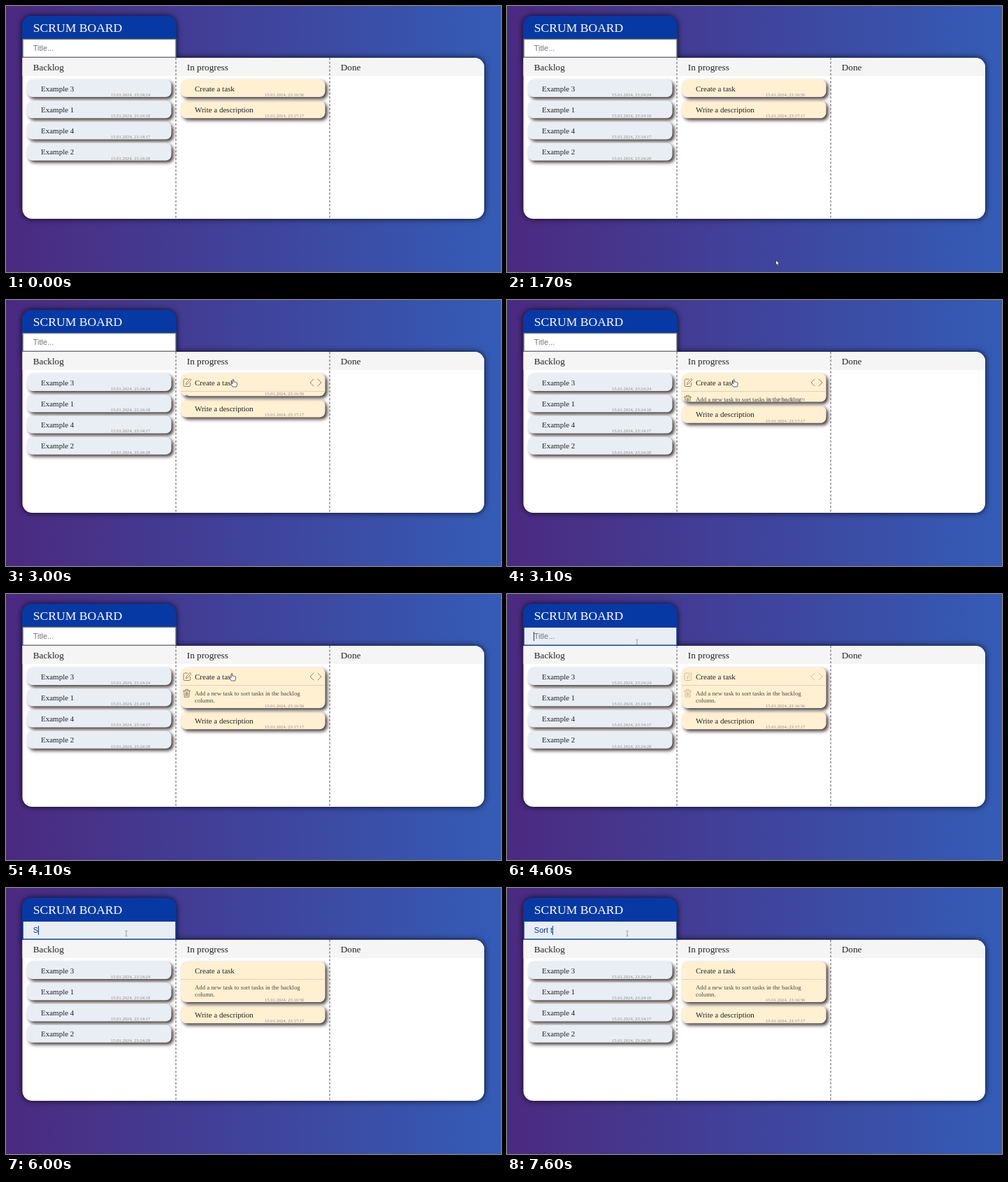
Recreate the animation shown at these times as an HTML page. Size 708 px wide and 380 px high, loop 8000 ms.

```html
<!DOCTYPE html>
<html lang="en">
<head>
<meta charset="utf-8">
<title>Scrum board</title>
<style>
  html, body { margin: 0; width: 100%; height: 100%; overflow: hidden; }
  body { background: linear-gradient(to right, #4b2a80, #345cb6); }
  svg { display: block; width: 708px; height: 380px; font-family: "Liberation Serif", "Times New Roman", serif; }
  text { white-space: pre; }
  .glow { filter: drop-shadow(0 0 4px rgba(0, 0, 0, .85)); }
  .tile { filter: drop-shadow(3px 3px 2.7px rgba(20, 8, 8, .8)); }
  .heading { font-size: 13.2px; fill: #222; }
  .name { font-size: 11px; fill: #222; }
  .note { font-size: 8.8px; fill: #4d473f; }
  .date { font-size: 6.6px; fill: #8d8a86; }
  .input { font: 11px "Liberation Sans", Arial, sans-serif; }
  .icon { fill: none; stroke: #85765b; stroke-width: .9; stroke-linecap: round; stroke-linejoin: round; }
  .cursor { fill: #fff; stroke: #222; stroke-width: .7; stroke-linejoin: round; }
</style>
</head>
<body>
<svg viewBox="0 0 708 380">
  <defs>
    <clipPath id="cardClip"><rect id="clipBox" x="250" y="105" width="206.5" height="25" rx="8"/></clipPath>
  </defs>

  <path class="glow" d="M23 76V28a14 14 0 0 1 14-14H229.500a14 14 0 0 1 14 14V76z" fill="#0639a4"/>
  <path class="glow" d="M23.500 74H670a14 14 0 0 1 14 14V290a14 14 0 0 1-14 14H37.500a14 14 0 0 1-14-14z" fill="#fff"/>
  <path d="M23.500 74H670a14 14 0 0 1 14 14V100H23.500z" fill="#f5f5f5"/>
  <path d="M23 74V28a14 14 0 0 1 14-14H229.500a14 14 0 0 1 14 14V74z" fill="#0639a4"/>
  <text x="38.700" y="37" font-size="17.6" fill="#fff">SCRUM BOARD</text>

  <rect id="field" x="24.100" y="47.400" width="218.800" height="25.800" stroke-width="1.3"/>
  <text id="entry" class="input" x="38.800" y="64.300"></text>
  <rect id="caret" y="54" width="1" height="13" fill="#0639a4"/>

  <path d="M243 74V304M463 74V304" stroke="#666" stroke-width="1.1" stroke-dasharray="3.3 2.2"/>
  <g id="board"></g>

  <g id="openCard">
    <rect id="openTile" class="tile" x="250" y="105" width="206.5" height="25" rx="8" fill="#fff0d2"/>
    <g clip-path="url(#cardClip)">
      <path id="divider" d="M250 130.500H457" stroke="#dcd1b7" stroke-width=".9"/>
      <text class="name" x="270" y="121.500">Create a task</text>
      <text class="note" x="270" y="145">Add a new task to sort tasks in the backlog</text>
      <text class="note" x="270" y="155.400">column.</text>
      <text id="openDate" class="date" x="370" y="128.800">15.01.2024, 23:16:56</text>
      <g id="icons" class="icon">
        <path d="M260 113H255.500q-1.500 0-1.500 1.500V122q0 1.500 1.500 1.500H262q1.500 0 1.500-1.500V118.500M257.500 120.500l.7-2.700 5-5.300 1.700 1.600-5 5.400z"/>
        <path d="M440 113l-5 5 5 5M446 113l5 5-5 5"/>
        <path d="M253.500 138.300H263.500M256.500 138V136.300H260.500V138M254.500 138.500l.7 8.700H261.800l.7-8.700M257 140.500V145.200M258.500 140.500V145.200M260 140.500V145.200"/>
      </g>
    </g>
  </g>

  <g id="cursor" class="cursor">
    <path id="arrow" d="M0 0V7.200l1.700-1.500 1.200 2.600 1.200-.6-1.100-2.400H5.200z"/>
    <path id="hand" d="M-.9 6.500V1Q0-.6.900 1V4.200Q1.800 3.400 2.500 4.500 3.400 3.800 4 4.900 5.300 4.300 5.500 5.800V8.200L4.600 11H-.6L-3.200 7.300Q-3.300 5.800-2 6z"/>
    <path id="beam" d="M-1.500-3.800Q0-3.800 0-3 0-3.800 1.500-3.800M0-3V3M-1.500 3.800Q0 3.800 0 3 0 3.800 1.500 3.800" fill="none" stroke="#777"/>
  </g>
</svg>

<script>
const LOOP = 8000, STEP = 100;
const $ = id => document.getElementById(id);
const set = (id, attributes) => {
  for (const key in attributes) $(id).setAttribute(key, attributes[key]);
};
const clamp = v => Math.min(1, Math.max(0, v));
const ramp = (t, start, end) => clamp((t - start) / (end - start));
const smooth = p => (1 - Math.cos(Math.PI * p)) / 2;

const card = (x, y, name, time, color, id = '') => `<g id="${id}">
  <rect class="tile" x="${x}" y="${y}" width="206.5" height="25" rx="8" fill="${color}"/>
  <text class="name" x="${x + 20}" y="${y + 16.5}">${name}</text>
  <text class="date" x="${x + 120}" y="${y + 23.8}">15.01.2024, ${time}</text></g>`;

const headings = ['Backlog', 'In progress', 'Done'];
const backlog = [['Example 3', '23:24:24'], ['Example 1', '23:24:18'], ['Example 4', '23:14:17'], ['Example 2', '23:24:28']];
$('board').innerHTML =
  headings.map((h, i) => `<text class="heading" x="${38.8 + 220 * i}" y="91.500">${h}</text>`).join('') +
  backlog.map(([name, time], i) => card(30, 105 + 30.25 * i, name, time, '#e9eef4')).join('') +
  card(250, 135.25, 'Write a description', '23:17:17', '#fff0d2', 'lowerCard');

// [time, x, y] of the pointer's hot spot
const path = [
  [1700, 384.5, 363], [1900, 380, 315], [2100, 369, 245], [2300, 352, 178], [2500, 336, 132],
  [2700, 327, 115], [3000, 325, 113], [3400, 323, 113], [4100, 323, 113],
  [4300, 280, 100], [4500, 200, 73], [4700, 172, 65]
];
function pointerAt(t) {
  const next = path.findIndex(p => p[0] > t);
  if (next < 1) return path[next ? path.length - 1 : 0].slice(1);
  const [a, b] = [path[next - 1], path[next]];
  const p = ramp(t, a[0], b[0]);
  return [1, 2].map(i => a[i] + (b[i] - a[i]) * p);
}

// [time, typed text]
const typing = [[0, ''], [5700, 'S'], [6500, 'Sor'], [6700, 'Sort'], [6900, 'Sort '], [7600, 'Sort t']];
const FOCUS = 4600;

function drawInput(t) {
  const focused = t >= FOCUS;
  const [since, typed] = typing.filter(k => k[0] <= t).pop();
  const entry = $('entry');
  set('field', { fill: focused ? '#e9eef4' : '#fff', stroke: focused ? '#0639a4' : '#767676' });
  entry.textContent = typed;
  const caretX = 38.8 + (typed ? entry.getComputedTextLength() : 0);
  if (!typed) entry.textContent = 'Title...';
  set('entry', { fill: typed ? '#0639a4' : '#757575' });
  const blinkStart = Math.max(since, 4800);
  const lit = t < blinkStart || Math.floor((t - blinkStart) / 500) % 2 === 0;
  set('caret', { x: Math.floor(caretX), opacity: focused && lit ? 1 : 0 });
}

function drawCard(t) {
  const grow = 33 * smooth(ramp(t, 2820, 3400));
  const hover = ramp(t, 2500, 2900) * (1 - ramp(t, 4300, 4850));
  set('openTile', { height: 25 + grow });
  set('clipBox', { height: 25 + grow });
  set('divider', { opacity: clamp(grow / 3) });
  set('openDate', { y: 128.8 + grow });
  set('lowerCard', { transform: `translate(0 ${grow})` });
  set('icons', { opacity: hover });
}

function drawPointer(t) {
  const shape = t >= FOCUS ? 'beam' : t >= 2500 && t < 4300 ? 'hand' : 'arrow';
  for (const id of ['arrow', 'hand', 'beam']) set(id, { visibility: id === shape && t >= 1700 ? 'visible' : 'hidden' });
  set('cursor', { transform: `translate(${pointerAt(t)})` });
}

function frame() {
  const t = Math.floor(performance.now() % LOOP / STEP) * STEP;
  drawInput(t);
  drawCard(t);
  drawPointer(t);
  requestAnimationFrame(frame);
}
frame();
</script>
</body>
</html>
```
